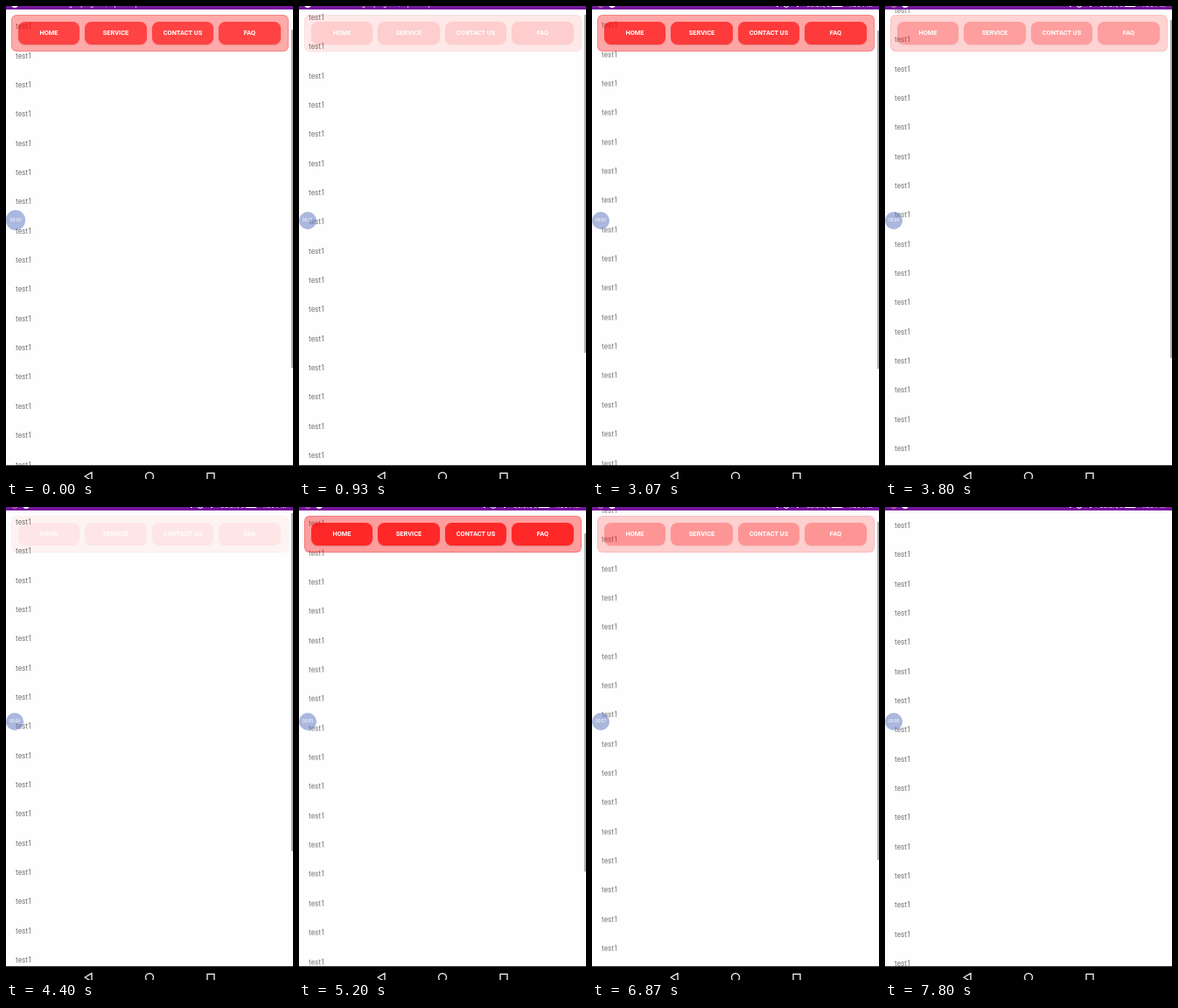
An HTML page for the animation above (8 s loop, 328x540 px).

```html
<!DOCTYPE html>
<html lang="en">
<head>
<meta charset="utf-8">
<title>Scroll fade header</title>
<style>
  html, body { margin: 0; width: 100%; height: 100%; overflow: hidden; background: #fefefe; }
  body { position: relative; font-family: Roboto, sans-serif; }
  #stage { position: absolute; left: 0; top: 0; width: 328px; height: 540px; overflow: hidden; background: #fefefe; }
  #stage > * { position: absolute; }
  #list { left: 11px; top: 5.3px; font-size: 8.2px; line-height: 33.35px; color: #757575; will-change: transform; }
  #header {
    left: 5.7px; top: 10px; width: 317px; height: 42px; box-sizing: border-box;
    border: 1px solid rgba(225, 20, 35, .4); border-radius: 6px;
    background: rgba(255, 0, 0, .45);
  }
  #header span {
    position: absolute; top: 6.8px; width: 70.6px; height: 26.2px; border-radius: 7.5px;
    background: #f00; box-shadow: 0 .7px 1.5px rgba(90, 0, 0, .3);
    color: #fff; font-size: 7.4px; font-weight: 700; line-height: 26.2px; text-align: center;
  }
  #thumb { right: 0; top: 0; width: 2.2px; height: 386px; background: #adadad; }
  #bubble {
    left: 0; border-radius: 50%; background: rgba(88, 112, 188, .5);
    color: #fff; text-align: center; white-space: nowrap;
  }
  svg { left: 0; top: 0; }
</style>
</head>
<body>
<div id="stage">
  <div id="list"></div>
  <div id="header"></div>
  <div id="thumb"></div>
  <svg width="328" height="540" font-family="Roboto, sans-serif">
    <rect width="328" height="4" fill="#75169c"/>
    <g id="ticker" fill="#fff" font-size="7.3">
      <circle cx="10" cy="-2" r="4"/>
      <text x="21" y="0">Screen recording in progress, tap to stop</text>
    </g>
    <g id="icons" fill="#fff" font-size="7.8">
      <circle cx="10" cy="-2" r="3.4" fill="none" stroke="#c98fb0"/>
      <circle cx="23" cy="-2" r="4"/>
      <path d="M209 -2l3 3 1 -3M233 -2l2 3 2 -3M274 -5h12v5.5h-12z" fill="none" stroke="#fff"/>
      <circle cx="222" cy="-2" r="3.3" fill="none" stroke="#fff"/>
      <text x="245" y="1">50.3K/s</text>
      <text x="292" y="1">4:36 PM</text>
    </g>
    <rect y="524.3" width="328" height="16"/>
    <g fill="none" stroke="#e8e8e8" stroke-width="1.4">
      <path d="M98 532.3L90 537l8 4.7z" stroke-linejoin="round"/>
      <circle cx="164" cy="537" r="4.5"/>
      <rect x="230" y="533.3" width="8" height="8"/>
    </g>
  </svg>
  <div id="bubble"></div>
</div>
<script>
const LOOP = 8000;
const STEP = 1000 / 15;   // the picture advances at 15 frames per second
const FULL_AT = 42;       // scroll offset at which the header is opaque
const BAR_RATIO = 0.743;  // thumb travel per scrolled pixel
const START_OFFSET = 31;

// Each drag eases the list from where it rests to a new offset.
const DRAGS = [
  { from: 0, to: 670, offset: 8 },
  { from: 1200, to: 2330, offset: 14 },
  { from: 2400, to: 3200, offset: 34 },
  { from: 3270, to: 4200, offset: 4 },
  { from: 4730, to: 5370, offset: 42 },
  { from: 5930, to: 6400, offset: 137 },
  { from: 6400, to: 7000, offset: 0 }
];

const $ = id => document.getElementById(id);
const clamp = x => Math.min(1, Math.max(0, x));
const progress = (t, from, to) => clamp((t - from) / (to - from));
const smooth = u => u * u * (3 - 2 * u);

$("list").innerHTML = "<div>test1</div>".repeat(21);
$("header").innerHTML = ["HOME", "SERVICE", "CONTACT US", "FAQ"]
  .map((label, i) => `<span style="left:${7 + i * 76.5}px">${label}</span>`).join("");

const scrollAt = t => DRAGS.reduce(
  (s, { from, to, offset }) => s + (offset - s) * smooth(progress(t, from, to)),
  START_OFFSET
);

function drawBubble(t) {
  const size = 22.4 - 2.4 * progress(t, 0, 400);
  const style = $("bubble").style;
  style.width = style.height = style.lineHeight = size + "px";
  style.top = 244.5 - size / 2 + "px";
  style.fontSize = size * 0.24 + "px";
  $("bubble").textContent = "00:0" + Math.floor((t + 205) / 1000);
}

function draw(now) {
  const t = Math.floor((now % LOOP + 4) / STEP) * STEP % LOOP;
  const s = scrollAt(t);
  $("list").style.transform = `translateY(${-s}px)`;
  $("header").style.opacity = clamp(s / FULL_AT);
  $("thumb").style.transform = `translateY(${4 + s * BAR_RATIO}px)`;
  $("thumb").style.opacity = 1 - progress(t, 7050, 7330);
  $("ticker").style.display = t < 2000 ? "" : "none";
  $("icons").style.display = t < 2000 ? "none" : "";
  drawBubble(t);
}

const start = performance.now();
function tick() {
  draw(performance.now() - start);
  requestAnimationFrame(tick);
}
tick();
</script>
</body>
</html>
```
